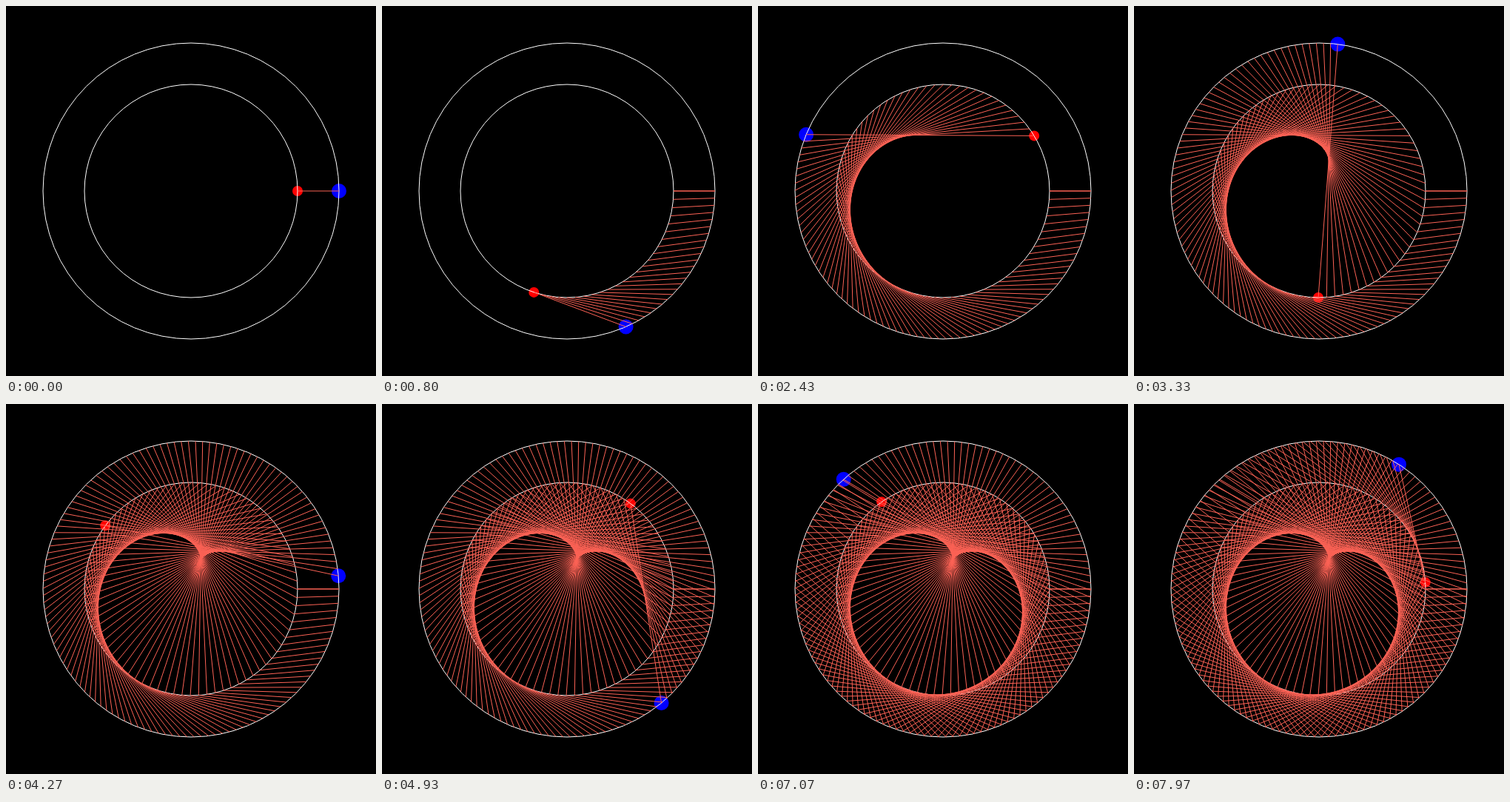
Write an HTML page with a canvas that moves like this. It is 500x500 px and loops after 8000 ms.

```html
<!DOCTYPE html>
<html lang="en">
<head>
<meta charset="utf-8">
<title>Two orbits</title>
<style>
  html, body { margin: 0; height: 100%; overflow: hidden; background: #000; }
  canvas { display: block; }
</style>
</head>
<body>
<canvas id="stage" width="500" height="500"></canvas>
<script>
const ctx = document.getElementById('stage').getContext('2d');
const CENTER = 250;
const LOOP = 8000;
const FPS = 30;
const inner = { orbit: 144, step: 4.504, size: 7, color: '#f00' };
const outer = { orbit: 200, step: 2.7727, size: 10, color: '#00f' };
const planets = [outer, inner];

function position(planet, step) {
  const angle = planet.step * step * Math.PI / 180;
  return [
    CENTER + planet.orbit * Math.cos(angle),
    CENTER + planet.orbit * Math.sin(angle)
  ];
}

function circlePath(x, y, radius) {
  ctx.beginPath();
  ctx.arc(x, y, radius, 0, 2 * Math.PI);
}

function drawLink(step) {
  ctx.beginPath();
  ctx.moveTo(...position(inner, step));
  ctx.lineTo(...position(outer, step));
  ctx.stroke();
}

function draw(step) {
  ctx.fillStyle = '#000';
  ctx.fillRect(0, 0, 500, 500);
  ctx.lineWidth = 1;

  for (const planet of planets) {
    ctx.fillStyle = planet.color;
    circlePath(...position(planet, step), planet.size);
    ctx.fill();
  }

  ctx.strokeStyle = '#fff';
  for (const planet of planets) {
    circlePath(CENTER, CENTER, planet.orbit);
    ctx.stroke();
  }

  ctx.strokeStyle = '#fc6255';
  for (let i = 0; i <= step; i++) drawLink(i);
  // The opening link is laid down twice once the planets move.
  if (step > 0) drawLink(0);
}

// Steps change on a 10 ms clock.
function stepAt(time) {
  const tick = Math.floor(time % LOOP / 10) * 10;
  return Math.floor((tick + 5) * FPS / 1000);
}

function frame() {
  draw(stepAt(performance.now()));
  requestAnimationFrame(frame);
}

frame();
</script>
</body>
</html>
```
